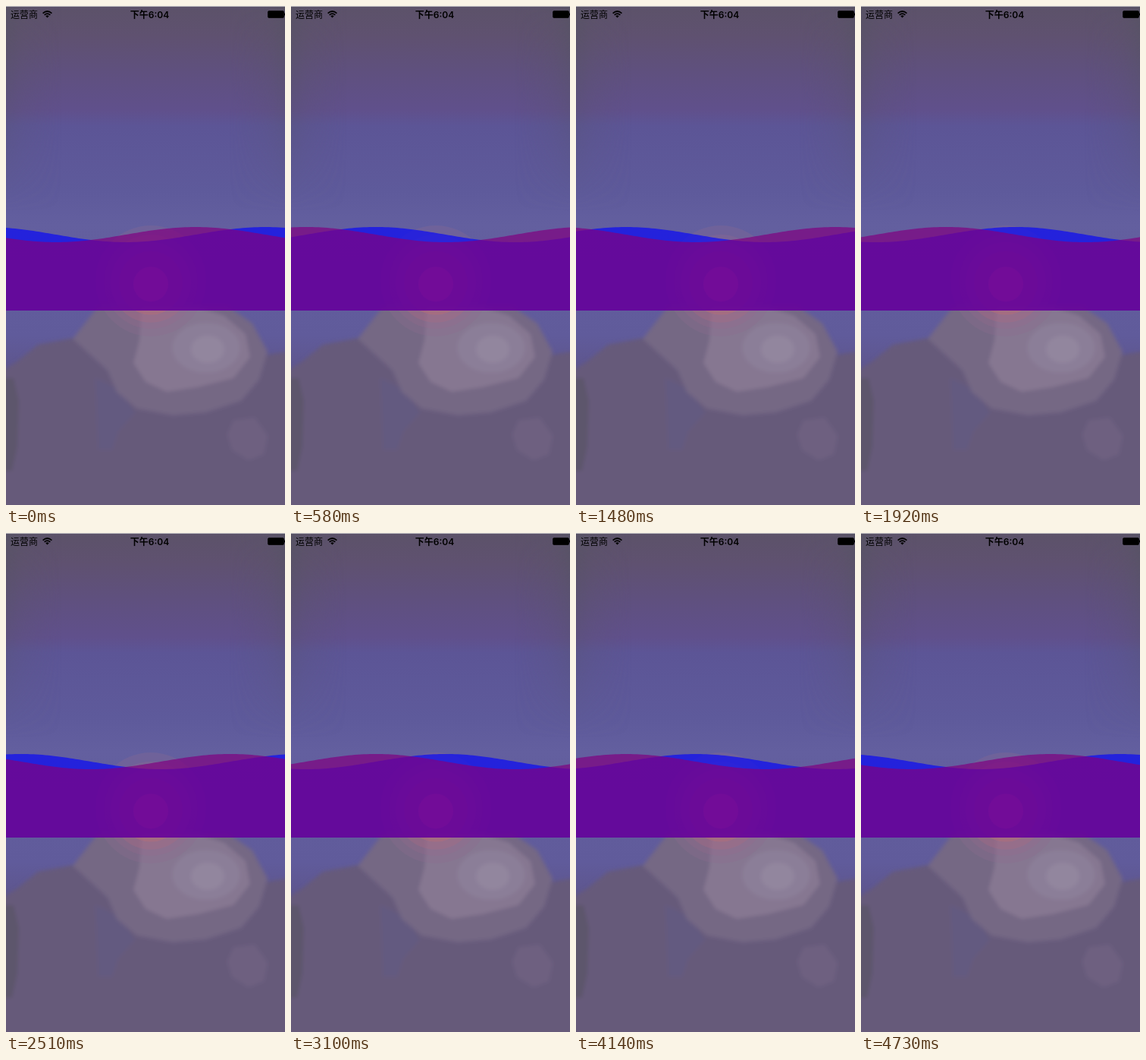
Write an HTML page that moves like this. It is 368 px wide and 657 px high and loops after 4830 ms.

```html
<!DOCTYPE html>
<html lang="zh-CN">
<head>
<meta charset="utf-8">
<title>Waves</title>
<style>
  html, body { margin: 0; width: 100%; height: 100%; overflow: hidden; }
  svg { display: block; width: 368px; height: 657px; }
  text { font-size: 12px; font-family: Inter, "Noto Sans CJK SC", "Noto Sans CJK", sans-serif; }
</style>
</head>
<body>
<svg viewBox="0 0 368 657">
  <defs>
    <linearGradient id="sky" x1="0" y1="0" x2="0" y2="657" gradientUnits="userSpaceOnUse">
      <stop offset="0" stop-color="#5c5269"/>
      <stop offset=".06" stop-color="#5f5170"/>
      <stop offset=".13" stop-color="#5f507e"/>
      <stop offset=".21" stop-color="#60508c"/>
      <stop offset=".24" stop-color="#5c5596"/>
      <stop offset=".37" stop-color="#5e5a9b"/>
      <stop offset=".44" stop-color="#635f9f"/>
      <stop offset=".66" stop-color="#605b9b"/>
      <stop offset=".74" stop-color="#5d548a"/>
      <stop offset="1" stop-color="#645876"/>
    </linearGradient>
    <linearGradient id="edges">
      <stop offset="0" stop-color="#555462" stop-opacity=".6"/>
      <stop offset=".06" stop-color="#5a5468" stop-opacity=".35"/>
      <stop offset=".2" stop-color="#5c5470" stop-opacity="0"/>
      <stop offset=".8" stop-color="#5c5470" stop-opacity="0"/>
      <stop offset=".94" stop-color="#5a5468" stop-opacity=".35"/>
      <stop offset="1" stop-color="#555462" stop-opacity=".6"/>
    </linearGradient>
    <linearGradient id="fade" x1="0" y1="0" x2="0" y2="1">
      <stop offset="0" stop-color="#fff"/>
      <stop offset="1" stop-color="#000"/>
    </linearGradient>
    <mask id="topFade"><rect width="368" height="270" fill="url(#fade)"/></mask>
    <filter id="soft" x="-20%" y="-20%" width="140%" height="140%"><feGaussianBlur stdDeviation="2.5"/></filter>
  </defs>

  <rect width="368" height="657" fill="url(#sky)"/>
  <rect width="368" height="270" fill="url(#edges)" mask="url(#topFade)"/>

  <g filter="url(#soft)">
    <path fill="#665a7a" d="M-20 490L15 468 42 446 95 436 120 420 330 462 388 452V680H-20Z"/>
    <path fill="#5d566c" d="M-20 490H10L17 520 15 580 8 612H-20Z"/>
    <path fill="#645a80" d="M118 490L150 505 170 535 148 560 140 584 122 584Z"/>
    <path fill="#746784" d="M122 395L88 438 112 460 134 480 146 508 172 530 220 539 264 535 310 520 334 492 345 455 325 418 292 395Z"/>
    <path fill="#867791" d="M180 395L176 440 168 470 184 495 212 508 252 502 300 490 322 462 316 432 288 408 250 395Z"/>
    <ellipse cx="264" cy="450" rx="45" ry="33" fill="#8b7e98"/>
    <ellipse cx="266" cy="452" rx="22" ry="18" fill="#92869e"/>
    <path fill="#6e6180" d="M300 546L328 542 345 566 340 590 320 598 298 584 292 564Z"/>
  </g>
  <g id="glow"></g>

  <path id="back" fill="#00f" fill-opacity=".64"/>
  <path id="front" fill="#800080" fill-opacity=".7"/>

  <rect width="368" height="1" fill="#bdbbc0"/>
  <text x="6" y="16">运营商</text>
  <text x="189.5" y="15.5" text-anchor="middle" font-weight="600">下午6:04</text>
  <g fill="none" stroke="#000" stroke-width="1.7">
    <path d="M48.6 9.6Q54.5 4.4 60.4 9.6M50.7 11.8Q54.5 8.4 58.3 11.8"/>
    <path fill="#000" stroke="none" d="M52.3 13.2Q54.5 11.2 56.7 13.2L54.5 15.6Z"/>
  </g>
  <rect x="345.5" y="6.5" width="21" height="9" rx="1.5" stroke="#000" stroke-opacity=".7"/>
  <path d="M367 9.5h1v3h-1z"/>
</svg>
<script>
  const WIDTH = 368, LOOP = 4830, STEP = 147.7;
  const $ = id => document.getElementById(id);

  // Concentric rings of the low sun: radius, colour, opacity
  $('glow').innerHTML = [
    [73, '#8a6c90', .3], [62, '#96688a', .25], [53, '#a86c80', .35],
    [42, '#b46e7a', .5], [23, '#e67882', .9]
  ].map(([r, fill, alpha]) =>
    `<circle cx="191" cy="${362 + (73 - r) / 12}" r="${r}" fill="${fill}" opacity="${alpha}"/>`).join('');

  // One full cosine wavelength across the stage, filled down to the band's edge
  function wave(crest) {
    let d = 'M0 401';
    for (let x = 0; x <= WIDTH; x += 4)
      d += `L${x} ${(301 - 10 * Math.cos((x - crest) / WIDTH * 2 * Math.PI)).toFixed(2)}`;
    return d + `L${WIDTH} 401Z`;
  }

  function draw(now) {
    const step = Math.floor((now % LOOP + 5) / STEP);
    const crest = 250 + step * WIDTH / 8;
    $('front').setAttribute('d', wave(crest));
    $('back').setAttribute('d', wave(crest + WIDTH / 4));
    requestAnimationFrame(draw);
  }
  draw(0);
</script>
</body>
</html>
```
